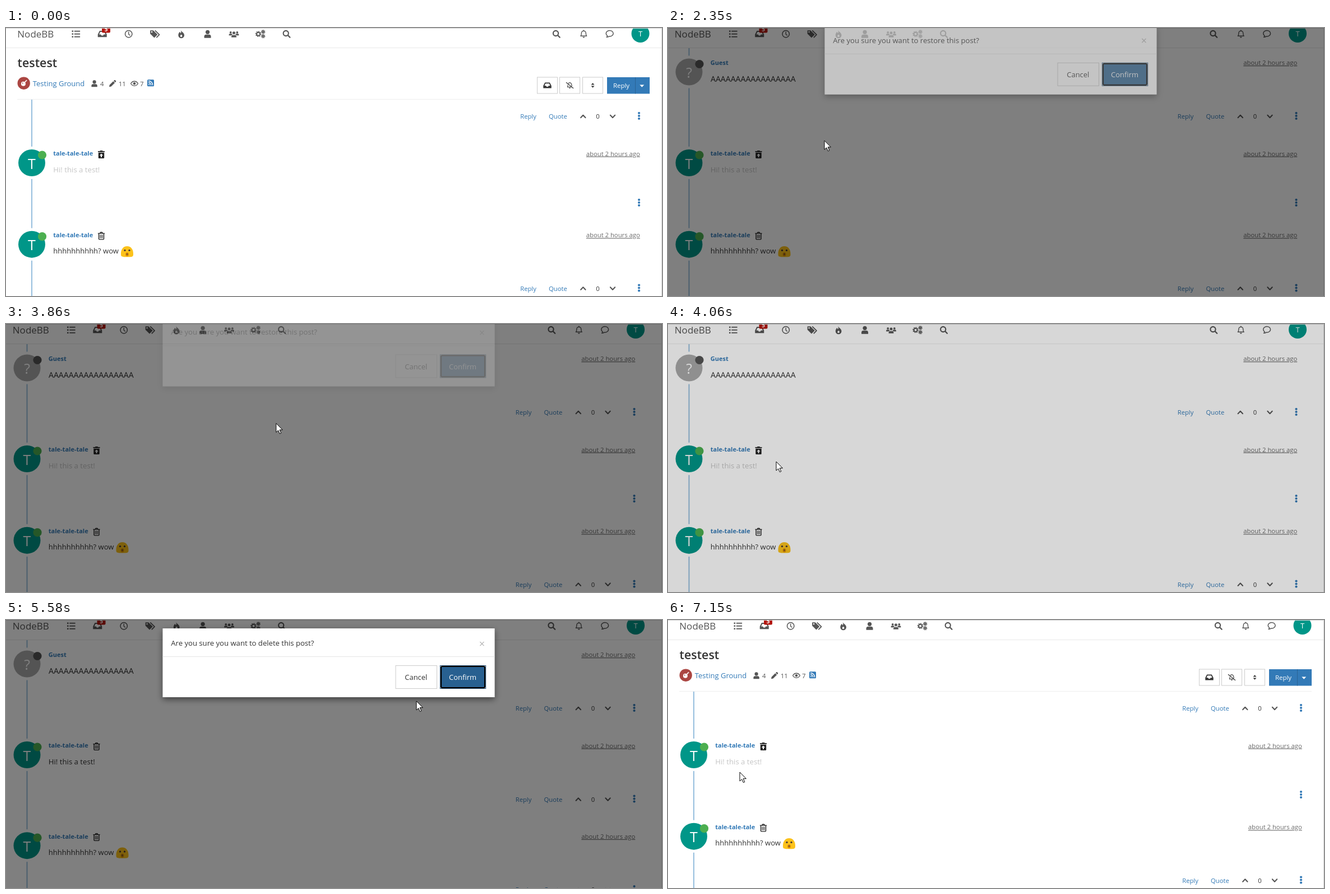
An HTML page for the animation above (7220 ms loop, 1170x479 px).

```html
<!DOCTYPE html>
<html lang="en">
<head>
<meta charset="utf-8">
<title>Restore and delete a post</title>
<style>
  html, body { margin: 0; width: 100%; height: 100%; overflow: hidden; background: #fff; }
  svg { display: block; width: 1170px; height: 479px; font-family: 'Open Sans', 'Noto Sans', sans-serif; }
  .line { fill: none; stroke: currentColor; stroke-linecap: round; stroke-linejoin: round; }
</style>
</head>
<body>
<svg id="stage" viewBox="0 0 1170 479" xmlns="http://www.w3.org/2000/svg"></svg>
<script>
const LOOP = 7220, SHIFT = -8.5, GROW = 16.5;
const BLUE = '#337ab7', GREY = '#555', INK = '#333', USER = 'tale-tale-tale';

const text = (x, y, size, str, fill = INK, more = '') =>
  `<text x="${x}" y="${y}" font-size="${size}" fill="${fill}" ${more}>${str}</text>`;
const rect = (x, y, w, h, fill, more = '') =>
  `<rect x="${x}" y="${y}" width="${w}" height="${h}" fill="${fill}" ${more}/>`;
const circle = (x, y, r, fill, more = '') =>
  `<circle cx="${x}" cy="${y}" r="${r}" fill="${fill}" ${more}/>`;
const path = (d, more = '') => `<path d="${d}" ${more}/>`;
const line = (d, w = 1.6) => path(d, `class="line" stroke-width="${w}"`);
const at = (x, y, body, color = GREY, scale = 1) =>
  `<g transform="translate(${x} ${y}) scale(${scale})" fill="${color}" color="${color}">${body}</g>`;
const group = (id, body) => `<g id="${id}">${body}</g>`;
const ring = (x, y, r, w, more = '') =>
  circle(x, y, r, 'none', `stroke="currentColor" stroke-width="${w}" ${more}`);
const middle = 'text-anchor="middle"';

// Icons are drawn around their own centre.
const person = circle(0, -3.4, 3.6, 'currentColor') + path('M-6 7V4.5Q-6 1-2.8 1H2.8Q6 1 6 4.5V7Z');
const cog = (x, y, r) => ring(x, y, r, 1.9) +
  ring(x, y, r + 1.5, 1.6, `pathLength="16" stroke-dasharray="1.1 .9"`);
const icons = {
  list: [-5, 0, 5].map(y => rect(-7.3, y - 1.2, 2.6, 2.4, GREY) + rect(-3, y - .9, 10.3, 1.8, GREY)).join(''),
  inbox: path('M-4.8-5.6H4.8L8 .8V5.6H-8V.8ZM-3.7-3.6L-5.7 .8H-2.6L-1.4 2.8H1.4L2.6 .8H5.7L3.7-3.6Z', 'fill-rule="evenodd"'),
  clock: ring(0, 0, 6.2, 1.5) + line('M0-3.6V.6L2.2 2.2', 1.4),
  tags: path('M-8.5-6.5H-3L4.6 1L-1.2 6.8L-8.5-.5Z') + circle(-5.6, -3.6, 1.3, '#fff') +
    line('M.6-5.8L7.8 1.2L3.2 6', 1.8),
  fire: path('M-1.2-7.5C.2-3.6 5.4-2.6 5.4 2.2A5.3 5.3 0 0 1-5.3 2.2C-5.3-.6-4-2-3-3.6C-1.6-2.8-1.4-2-1.2-1C.6-3-.4-5.4-1.2-7.5Z') +
    path('M0 1C2.6 2.4 2.2 5.2 0 5.3C-2.6 5.2-2.4 2.4 0 1Z', 'fill="#fff"'),
  person,
  people: at(-5.8, -1, person, GREY, .52) + at(5.8, -1, person, GREY, .52) +
    `<g stroke="#fff" stroke-width="1">${at(0, .8, person, GREY, .8)}</g>`,
  cogs: cog(-3.4, 0, 3) + cog(5.2, -3.8, 1.5) + cog(5.2, 3.9, 1.5),
  search: ring(-1.2, -1.2, 4.6, 2.1) + line('M2.6 2.6L6 6', 2.3),
  bell: line('M-5.4 3.6H5.4C3.8 2 4.2 .2 3.9-1.6A3.9 3.9 0 0 0-3.9-1.6C-4.2 .2-3.8 2-5.4 3.6ZM0-6.8V-5.6', 1.4) +
    path('M-1.9 5H1.9A1.9 1.9 0 0 1-1.9 5Z'),
  comment: line('M-4.4 3.4A6.4 5.2 0 1 1-1.4 4.4Q-3.6 6-6.2 5.9Q-4.8 4.8-4.4 3.4Z', 1.4),
  pencil: path('M-6 6L-5.3 2.4L1.2-4.1L4.1-1.2L-2.4 5.3ZM2-4.9L3.4-6.2Q4.2-6.6 5-5.9L5.9-5Q6.6-4.2 6-3.4L4.8-2Z'),
  eye: line('M-6.4 0C-3.4-5.4 3.4-5.4 6.4 0C3.4 5.4-3.4 5.4-6.4 0Z', 1.3) + circle(0, 0, 2.2, 'currentColor'),
  feed: rect(-6, -6, 12, 12, BLUE, 'rx="1.5"') +
    `<g color="#fff">${line('M-3.5-3.5A7 7 0 0 1 3.5 3.5M-3.5-.6A4.1 4.1 0 0 1 .6 3.5', 1.4)}</g>` + circle(-2.8, 2.8, 1.1, '#fff'),
  muted: line('M-4.4 3.4H3.2M4.1 1.2C3.5-1 4.2-5 0-5.2Q-1.6-5.1-2.6-4M-3.8-.8Q-3.7 2-4.6 3.4', 1.2) +
    path('M-1.6 4.8H1.6A1.6 1.6 0 0 1-1.6 4.8Z') + line('M-6.8-5.6L6.8 5.6', 1.3),
  sort: path('M-3.3-1.2L0-4.6L3.3-1.2ZM-3.3 1.2L0 4.6L3.3 1.2Z'),
  bomb: circle(-.8, 1, 4, '#fff') + line('M2-2L3.8-3.8L5-5', 1.6) + circle(-2, -.2, 1, '#ab4642'),
  trash: line('M-5.6-4.4H5.6M-2.2-4.8L-1.4-6.3H1.4L2.2-4.8M-4.5-4.2V5.3Q-4.5 6.4-3.4 6.4H3.4Q4.5 6.4 4.5 5.3V-4.2', 1.4) +
    line('M-2.1-1.6V3.8M0-1.6V3.8M2.1-1.6V3.8', 1),
  restore: path('M-6-6H-2.6L-2-7H2L2.6-6H6V-4.2H-6ZM-5.2-3.2H5.2V5.8Q5.2 7-4 7H-4Q-5.2 7-5.2 5.8Z'.replace('7-4 7', '7 4 7')) +
    path('M0-1.4L3.2 2H1V5H-1V2H-3.2Z', 'fill="#fff"'),
  dots: [-5, 0, 5].map(y => circle(0, y, 2.1, BLUE)).join(''),
};

const nav = () => {
  const left = ['list', 'inbox', 'clock', 'tags', 'fire', 'person', 'people', 'cogs', 'search'];
  return rect(-10, 0, 1200, 35, '#fff') + rect(-10, 35, 1200, 1, '#e9e9e9') +
    text(20.3, 17, 17, 'NodeBB', GREY, 'font-weight="500"') +
    left.map((name, i) => at(124.8 + i * 46.95, 10.7, icons[name])).join('') +
    rect(171, -6, 15, 14.6, '#b3160f', 'rx="2"') + text(178.5, 6, 10, '5', '#fff', `font-weight="700" ${middle}`) +
    at(981.7, 10.7, icons.search) + at(1030.3, 10.7, icons.bell) + at(1077.2, 10.5, icons.comment) +
    circle(1131.5, 10, 16, '#009688') + text(1131.5, 15.3, 13, 'T', '#fff', middle);
};

const button = (x, icon) => rect(x, 88, 36, 29, '#fff', 'stroke="#ccc"') + at(x + 18, 102.5, icons[icon], INK, .9);
const header = () => rect(0, 36, 1180, 91, '#fff') + rect(20, 127, 1128, 1, '#eee') +
  text(20.5, 70, 21.4, 'testest', INK, 'font-weight="600"') +
  circle(31.7, 98.7, 11.2, '#ab4642') + at(31.7, 98.7, icons.bomb, '#fff') +
  text(47.8, 103.5, 13, 'Testing Ground', BLUE) +
  at(157.6, 99.3, person, GREY, .86) + text(168, 103.5, 11.5, '4', GREY) +
  at(190, 99.3, icons.pencil) + text(200.7, 103.5, 11.5, '11', GREY) +
  at(229, 99.3, icons.eye) + text(239, 103.5, 11.5, '7', GREY) + at(258, 98.3, icons.feed) +
  button(947.5, 'inbox') + button(987.5, 'muted') + button(1028.5, 'sort') +
  rect(1072, 88, 76, 29.5, BLUE) + rect(1122, 88, 1, 29.5, '#2a6496') +
  text(1083, 107, 11.4, 'Reply', '#fff') + path('M1130.2 101.6H1138.2L1134.2 105.8Z', 'fill="#fff"');

const menu = y => at(1129, y - 1, icons.dots, BLUE);
const tools = y => text(917.3, y + 4.2, 11.2, 'Reply', BLUE) + text(968, y + 4.2, 11.3, 'Quote', BLUE) +
  at(1029.3, y, line('M-4.2 2.2L0-2.2L4.2 2.2', 2)) + text(1055.5, y + 4.2, 11.3, '0', INK, middle) +
  at(1082, y, line('M-4.2-2.2L0 2.2L4.2-2.2', 2)) + menu(y);

const post = (y, name, letter, fill, dot) =>
  rect(40, y - 29, 12, 58, '#fff') + circle(46, y, 24, fill) +
  text(46, y + 10.5, 25, letter, '#fff', middle) + circle(64.5, y - 14, 7.6, dot) +
  text(84.3, y - 12.6, 11, name, BLUE, 'font-weight="700"') +
  text(1034.8, y - 12.4, 11.27, 'about 2 hours ago', '#6c6c6c', 'text-decoration="underline"');
const member = y => post(y, USER, 'T', '#009688', '#4caf50');

const emoji = at(216, 400,
  path('M-11 5C-11.5-4-7-10 0-10C7-10 11.5-4 11 5C11 10 6 9.2 0 9.2C-6 9.2-11 10-11 5Z', 'fill="#fcc21b"') +
  circle(-4, -2.6, 1.7, '#4a3b34') + circle(4, -2.6, 1.7, '#4a3b34') +
  '<ellipse cy="4.6" rx="3" ry="3.6" fill="#e59600"/><ellipse cy="4.2" rx="1.5" ry="2" fill="#8a5a2b"/>');

const tip = (id, label, x, w) => group(id,
  rect(x, 187.3, w, 22.7, '#000', 'rx="1"') + path(`M${x + w / 2 - 4.5} 210h9l-4.5 4.5Z`) +
  text(x + w / 2, 203, 11.05, label, '#fff', middle));

const page = group('page',
  rect(45, 36, 2, 450, '#97bfde') +
  post(78.5, 'Guest', '?', '#aaa', '#555') + text(84.5, 95.7, 14.1, 'A'.repeat(17)) + tools(158) +
  member(241) +
  group('gone', text(84.3, 258, 13.2, 'Hi! this a test!', '#c6c6c6') + at(170, 226, icons.restore, '#222') + menu(313)) +
  group('live', text(84.3, 258, 13.2, 'Hi! this a test!') + at(170, 226, icons.trash, '#222') + tools(320.5)) +
  group('last', member(386.7) + at(170, 371.5, icons.trash, '#222') +
    text(84.3, 403, 13, 'hhhhhhhhhh? wow') + emoji + tools(465.5)) +
  group('header', header()) + nav() +
  tip('tipRestore', 'Restore', 142, 55.7) + tip('tipDelete', 'Delete', 142, 49.4));

const modal = group('modal',
  rect(279.5, 15, 592, 123, '#fff', 'filter="url(#shadow)"') +
  `<text id="ask" x="294.3" y="46" font-size="13.1" fill="${INK}"></text>` +
  text(848.8, 48.5, 18, '×', '#b5b5b5', middle) + rect(279.5, 65, 592, 1, '#e5e5e5') +
  rect(695, 81.5, 73.5, 41, '#fff', 'id="cancel" stroke="#ccc"') + text(731.3, 107.4, 12.95, 'Cancel', INK, middle) +
  rect(774.3, 81.5, 81.4, 41, '#fff', 'stroke="#204d74"') +
  rect(776, 83, 78, 38, '#286090', 'rx="2" stroke="#000" stroke-width="2.2"') +
  text(814.6, 107.4, 12.96, 'Confirm', '#fff', middle));

const arrow = path('M0 0V16L3.7 12.6L6.4 18.6L8.8 17.5L6.2 11.6H11.4Z',
  'fill="#fff" stroke="#000" stroke-width="1" stroke-linejoin="round"');
const hand = path('M-1.6 11V1.4Q-1.6 0 0 0Q1.5 0 1.5 1.4V6.2Q4-.2 4.4 0Z'.replace('Q4-.2 4.4 0Z', '') +
  'Q4.2 5.4 4.4 7Q6.4 6.4 6.9 7.8Q8.6 7.4 8.8 9.2V13.5Q8.6 16 7.2 17.4V19.4H-.8V17.6L-4.8 12.2Q-5.6 10.2-4 9.8Q-2.8 9.6-1.6 11Z',
  'fill="#fff" stroke="#000" stroke-width="1" stroke-linejoin="round"') +
  line('M1.6 11V14.4M3.6 11V14.4M5.6 11V14.4', .8);

stage.innerHTML = `<defs><filter id="shadow" x="-10%" y="-30%" width="120%" height="170%">
  <feDropShadow dx="0" dy="4" stdDeviation="6" flood-opacity=".5"/></filter></defs>` +
  rect(0, 0, 1170, 479, '#fff') + page +
  rect(0, 0, 1170, 1, '#d2d2d2') + rect(1169, 0, 1, 479, '#d2d2d2') +
  rect(0, 0, 1170, 479, '#000', 'id="shade"') + modal +
  group('cursor', group('arrow', arrow) + group('hand', hand));

// Pointer path: time, x, y, shape kept until the next point (1 = hand).
const track = [
  [870, 1122, 357, 0], [1200, 8, 300, 0], [1490, 166, 247, 0], [1690, 166, 247, 0], [1800, 167, 230, 1],
  [2090, 167, 230, 1], [2160, 167, 230, 0], [2780, 662, 103, 0], [2850, 662, 103, 0], [2930, 697, 95, 1],
  [2980, 733, 90, 1], [3520, 789, 101, 1], [3590, 789, 101, 1], [3660, 775, 108, 0], [4060, 193, 246, 0],
  [4260, 179, 242, 0], [4340, 179, 242, 0], [4480, 168, 231, 1], [5010, 167, 228, 1], [5090, 167, 228, 0],
  [5160, 175, 227, 0], [5580, 732, 145, 0], [5700, 775, 118, 1], [5780, 787, 108, 1], [5980, 787, 108, 1],
  [6330, 842, 97, 1], [6530, 842, 97, 1], [6600, 828, 102, 0], [7150, 128, 272, 0], [LOOP, 128, 272, 0],
];
const dialogs = [
  { open: 2090, close: 3590, verb: 'restore' },
  { open: 5090, close: 6530, verb: 'delete' },
];

const el = id => document.getElementById(id);
const ramp = (t, a, b) => Math.min(1, Math.max(0, (t - a) / (b - a)));
const smooth = p => p * p * (3 - 2 * p);
const show = (id, on) => el(id).setAttribute('display', on ? 'inline' : 'none');
const fade = (id, p) => el(id).setAttribute('opacity', p);
const move = (id, x, y) => el(id).setAttribute('transform', `translate(${x} ${y})`);

function pointer(t) {
  const i = Math.max(1, track.findIndex(k => k[0] > t));
  const [a, b] = [track[i - 1], track[i]], p = smooth(ramp(t, a[0], b[0]));
  return { x: a[1] + (b[1] - a[1]) * p, y: a[2] + (b[2] - a[2]) * p, hand: a[3] };
}

function draw(t) {
  const box = dialogs.find(d => t >= d.open && t < d.close + 540);
  const restored = t >= 4200 && t < 7130;
  move('page', box ? SHIFT : 0, 0);
  show('header', !box);
  show('gone', !restored);
  show('live', restored);
  move('last', 0, restored ? GROW : 0);
  fade('tipRestore', .9 * (ramp(t, 1755, 1905) - ramp(t, 2160, 2310)));
  fade('tipDelete', .9 * (ramp(t, 4500, 4650) - ramp(t, 5160, 5310)));

  show('shade', box);
  show('modal', box);
  if (box) {
    const s = t - box.open, e = t - box.close;
    const rise = 1 - (1 - ramp(s, 180, 460)) ** 2, fall = ramp(e, 20, 320);
    fade('shade', .5 * (ramp(s, 70, 220) - ramp(e, 368, 518)));
    fade('modal', Math.min(ramp(s, 180, 330), 1 - fall));
    move('modal', 0, -38 * (1 - rise + fall * fall));
    el('ask').textContent = `Are you sure you want to ${box.verb} this post?`;
  }

  const c = pointer(t);
  show('cursor', t >= 870);
  show('hand', c.hand);
  show('arrow', !c.hand);
  move('cursor', c.x, c.y);
  el('cancel').setAttribute('fill', box && c.hand && c.x > 695 && c.x < 769 && c.y < 123 ? '#e6e6e6' : '#fff');
}

const start = performance.now();
function tick() {
  draw((performance.now() - start) % LOOP);
  requestAnimationFrame(tick);
}
tick();
</script>
</body>
</html>
```
